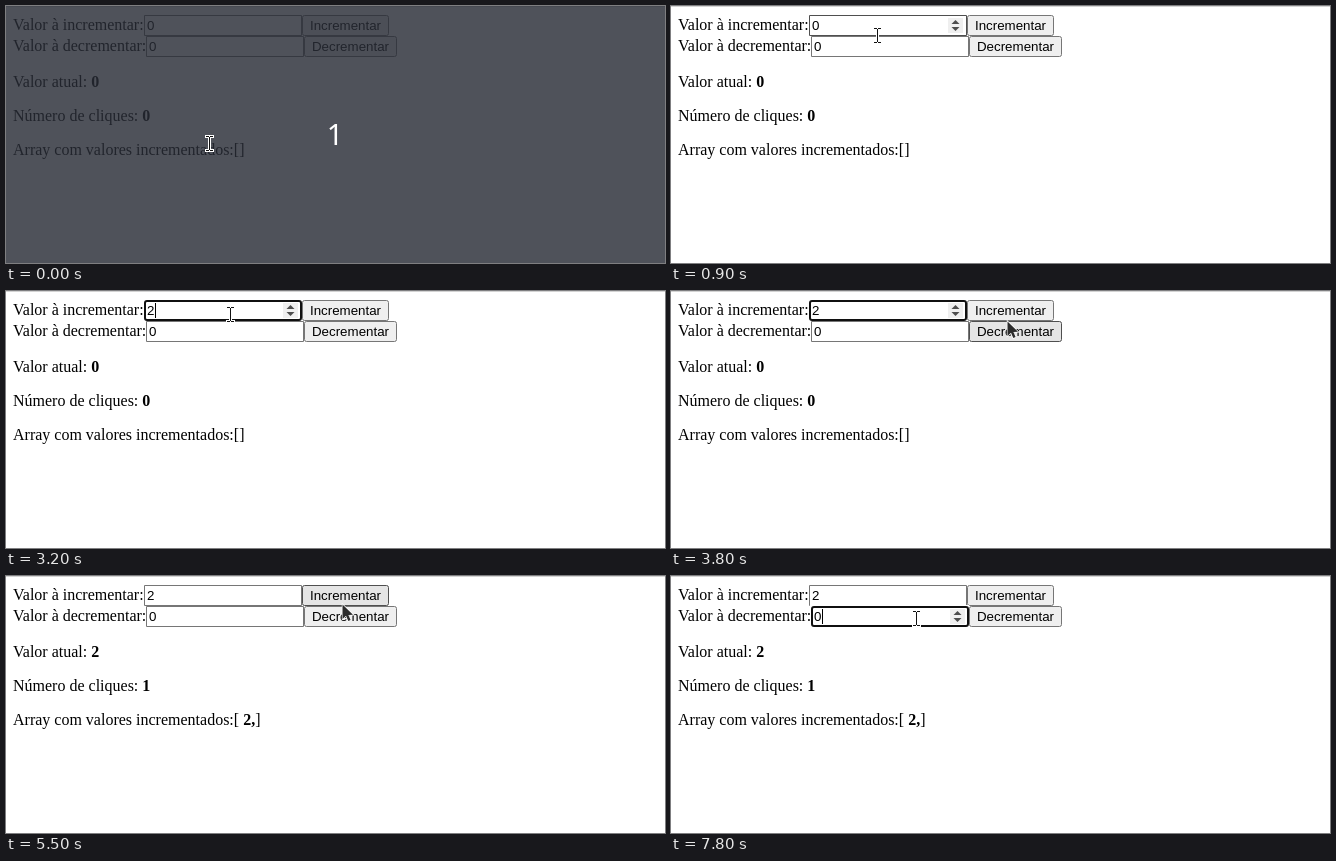
An HTML page with a canvas for the animation above (8000 ms loop, 659 by 257 pixels).

```html
<!DOCTYPE html>
<html lang="pt">
<head>
<meta charset="utf-8">
<style>
  html, body { margin: 0; width: 100%; height: 100%; overflow: hidden; background: #fff; }
  canvas { display: block; }
</style>
</head>
<body>
<canvas id="stage" width="659" height="257"></canvas>
<script>
const ctx = document.getElementById('stage').getContext('2d');
const SERIF = '16px "Liberation Serif", "Times New Roman", serif';
const SANS = '13.3333px "Liberation Sans", Arial, sans-serif';
const LOOP = 8000;

// time, x, y, pointer shape
const pointerPath = [
  [0, 203, 137, 'beam'], [300, 206, 140, 'beam'], [400, 209, 120, 'arrow'],
  [600, 208, 104, 'arrow'], [700, 207, 78, 'arrow'], [800, 206, 43, 'beam'], [900, 206, 29, 'beam'],
  [1100, 216, 26, 'beam'], [1200, 224, 23, 'beam'],
  [3500, 242, 25, 'beam'], [3600, 285, 29, 'beam'], [3700, 326, 33, 'arrow'],
  [3800, 336, 30, 'arrow'], [3900, 336, 29, 'arrow'], [4000, 336, 28, 'arrow'],
  [6800, 327, 29, 'arrow'], [6900, 313, 33, 'arrow'], [7000, 297, 39, 'beam'],
  [7100, 281, 46, 'beam'], [7200, 268, 50, 'beam'], [7400, 254, 45, 'beam'], [7500, 245, 42, 'beam']
];

const fields = [
  { label: 'Valor à incrementar:', x: 138, y: 9, button: 'Incrementar', bx: 296, bw: 87 },
  { label: 'Valor à decrementar:', x: 140, y: 30, button: 'Decrementar', bx: 298, bw: 93 }
];
const FIELD_W = 158, ROW_H = 21;

const within = (t, ...spans) => spans.some(([a, b]) => t >= a && t < b);

function text(str, x, y, font = SERIF, color = '#000') {
  ctx.font = font;
  ctx.fillStyle = color;
  ctx.fillText(str, x, y);
  return x + ctx.measureText(str).width;
}

function line(parts, y) {
  let x = 7;
  parts.forEach((part, i) => { x = text(part, x, y, (i % 2 ? 'bold ' : '') + SERIF); });
}

function frame(x, y, w, h, radius, fill, stroke, weight = 1) {
  ctx.beginPath();
  ctx.roundRect(x + weight / 2, y + weight / 2, w - weight, h - weight, radius);
  ctx.fillStyle = fill;
  ctx.fill();
  ctx.strokeStyle = stroke;
  ctx.lineWidth = weight;
  ctx.stroke();
}

function triangle(x, y, dir) {
  ctx.beginPath();
  ctx.moveTo(x - 4, y);
  ctx.lineTo(x + 4, y);
  ctx.lineTo(x, y + 4 * dir);
  ctx.fill();
}

function drawField({ x, y }, value, hover, focus, caret) {
  if (focus) {
    ctx.fillStyle = '#fff';
    ctx.fillRect(x - 1, y - 1, FIELD_W + 1, ROW_H + 1);
    frame(x, y, FIELD_W, ROW_H, 2, '#fff', '#101010', 2);
  } else {
    frame(x, y, FIELD_W, ROW_H, 0, '#fff', hover ? '#4f4f4f' : '#767676');
  }
  if (hover || focus) {
    ctx.fillStyle = '#efefef';
    ctx.fillRect(x + 139, y + 3, 15, 15);
    ctx.fillStyle = '#4d4d4d';
    triangle(x + 146.5, y + 9, -1);
    triangle(x + 146.5, y + 12, 1);
  }
  text(value, x + 3, y + 15, SANS);
  if (caret) ctx.fillRect(x + 11, y + 3, 1, 15);
}

function drawButton({ button, bx, bw, y }, hover, pressed) {
  const [fill, stroke] = pressed ? ['#f5f5f5', '#8d8d8d']
    : hover ? ['#e5e5e5', '#4f4f4f'] : ['#efefef', '#767676'];
  frame(bx, y, bw, ROW_H, 2, fill, stroke);
  ctx.font = SANS;
  text(button, bx + (bw - ctx.measureText(button).width) / 2, y + 15, SANS);
}

function drawPointer(x, y, shape) {
  ctx.save();
  ctx.translate(x, y);
  ctx.lineJoin = 'miter';
  if (shape === 'beam') {
    const bars = (color, grow) => {
      ctx.fillStyle = color;
      for (const [bx, by, w, h] of [[-3, -7, 3, 1], [1, -7, 3, 1], [0, -6, 1, 13], [-3, 7, 3, 1], [1, 7, 3, 1]])
        ctx.fillRect(bx - grow, by - grow, w + 2 * grow, h + 2 * grow);
    };
    bars('#fff', 1);
    bars('#111', 0);
  } else {
    ctx.beginPath();
    [[.5, .5], [.5, 15], [4, 11.8], [6.3, 17], [8.6, 16], [6.4, 11], [11, 10.8]]
      .forEach(([px, py]) => ctx.lineTo(px, py));
    ctx.closePath();
    ctx.strokeStyle = '#fff';
    ctx.lineWidth = 1.4;
    ctx.stroke();
    ctx.fillStyle = '#2b2b2b';
    ctx.fill();
  }
  ctx.restore();
}

function draw(t) {
  const [, px, py, shape] = pointerPath.findLast(p => p[0] <= t);
  const hotY = shape === 'arrow' ? py + 1 : py;
  const overRow = f => hotY >= f.y && hotY < f.y + ROW_H;
  const clicked = t >= 5500;
  const focus = [within(t, [1600, 5300]), t >= 7800];
  const caret = [within(t, [1600, 2200], [2800, 3700], [4200, 4900]), t >= 7800];
  const values = [t < 2800 ? '0' : t < 3200 ? '1' : '2', '0'];

  ctx.fillStyle = '#fff';
  ctx.fillRect(0, 0, 659, 257);
  ctx.fillStyle = '#d3d3d3';
  ctx.fillRect(0, 0, 659, 1);

  fields.forEach(f => {
    text(f.label, 7, f.y + 15);
    drawButton(f, overRow(f) && px >= f.bx && px < f.bx + f.bw, f === fields[0] && within(t, [5300, 5500]));
  });
  fields.forEach((f, i) =>
    drawField(f, values[i], overRow(f) && px >= f.x && px < f.bx, focus[i], caret[i]));

  line(['Valor atual: ', clicked ? '2' : '0'], 81);
  line(['Número de cliques: ', clicked ? '1' : '0'], 115);
  line(clicked ? ['Array com valores incrementados:[ ', '2,', ']'] : ['Array com valores incrementados:[]'], 149);

  if (t < 100) {
    ctx.fillStyle = 'rgba(41, 45, 54, 0.82)';
    ctx.fillRect(0, 0, 659, 257);
    ctx.textAlign = 'center';
    text('1', 329, 139, '29px "Noto Sans", "Open Sans", sans-serif', '#fff');
    ctx.textAlign = 'left';
  }
  drawPointer(px, py, shape);
}

function tick(now) {
  draw(now % LOOP);
  requestAnimationFrame(tick);
}
requestAnimationFrame(tick);
</script>
</body>
</html>
```
